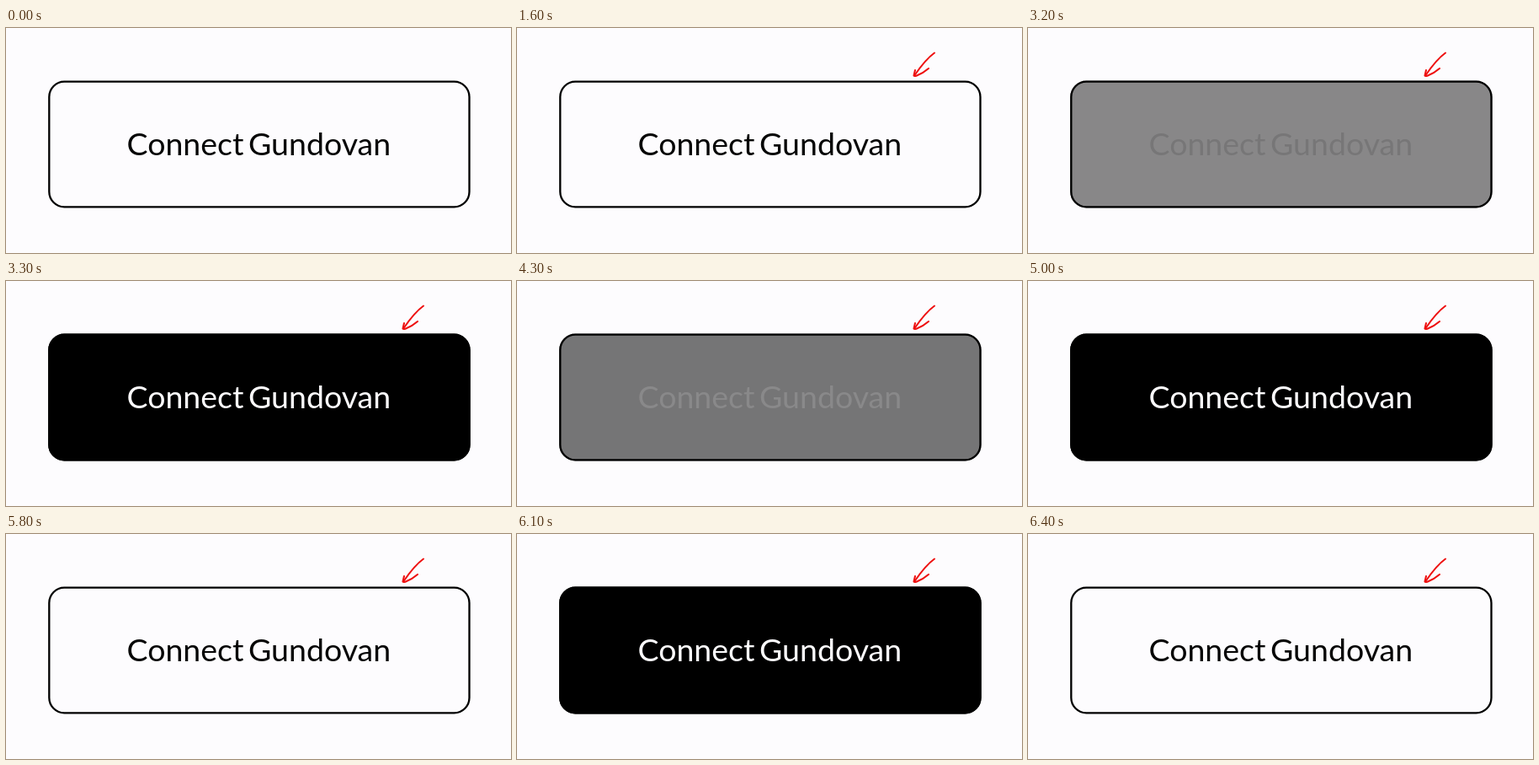
Write an HTML page that moves like this. It is 600 px wide and 267 px high and loops after 8.1 s.

```html
<!DOCTYPE html>
<html lang="en">
<head>
<meta charset="utf-8">
<title>Connect button</title>
<style>
  html, body { margin: 0; width: 100%; height: 100%; overflow: hidden; background: #fdfcfe; }
  svg { display: block; width: 600px; height: 267px; }
  text { font: 400 37.5px Lato, "Open Sans", sans-serif; }

  .hover, .arrow, .arrow path { animation: 8100ms step-end infinite; }
  .hover { opacity: 0; animation-name: hover; }
  .arrow {
    fill: none; stroke: #ee1111; stroke-width: 2.1;
    stroke-linecap: round; stroke-linejoin: round;
    animation-name: settle;
  }
  .arrow path { stroke-dasharray: 1 2; stroke-dashoffset: 1.1; }
  .arrow .shaft { animation-name: shaft; }
  .arrow .head { animation-name: head; }

  @keyframes shaft {
    0% { stroke-dashoffset: 1.1; }
    7.4% { stroke-dashoffset: .65; }
    8.64% { stroke-dashoffset: .25; }
    9.87%, 100% { stroke-dashoffset: 0; }
  }
  @keyframes head {
    0% { stroke-dashoffset: 1.1; }
    13.58% { stroke-dashoffset: .8; }
    14.81% { stroke-dashoffset: .6; }
    16.04% { stroke-dashoffset: .25; }
    17.28%, 100% { stroke-dashoffset: 0; }
  }
  @keyframes settle {
    0% { stroke-width: 2.4; }
    19.75%, 100% { stroke-width: 2.1; }
  }
  /* The pointer enters and leaves the button three times. */
  @keyframes hover {
    0% { opacity: 0; }
    39.5% { opacity: .46; }
    40.74% { opacity: 1; }
    53.08% { opacity: .535; }
    54.32% { opacity: .1; }
    55.55% { opacity: 0; }
    58.02% { opacity: .15; }
    59.25% { opacity: .6; }
    60.49% { opacity: .92; }
    61.72% { opacity: 1; }
    67.9% { opacity: .8; }
    69.13% { opacity: .35; }
    70.37% { opacity: .06; }
    71.6% { opacity: 0; }
    72.83% { opacity: .25; }
    74.07% { opacity: .75; }
    75.3% { opacity: 1; }
    77.77% { opacity: .46; }
    79.01%, 100% { opacity: 0; }
  }
</style>
</head>
<body>
<svg viewBox="0 0 600 267">
  <defs>
    <rect id="box" x="51.3" y="63.7" width="499.2" height="148.6" rx="18" stroke="#000" stroke-width="2.3"/>
    <text id="label" y="151"><tspan x="143.5">Connect</tspan> <tspan x="288">Gundovan</tspan></text>
  </defs>
  <use href="#box" fill="#fdfcfe"/>
  <use href="#label" fill="#050505"/>
  <g class="hover">
    <use href="#box" fill="#000"/>
    <use href="#label" fill="#fdfcfe"/>
  </g>
  <g class="arrow">
    <path class="shaft" pathLength="1" d="M496 29.5C487 36 480 45 472.5 56"/>
    <path class="head" pathLength="1" d="M473 50L471.5 56.5Q472 57.5 475 56.5Q482 54 489 48"/>
  </g>
</svg>
</body>
</html>
```
